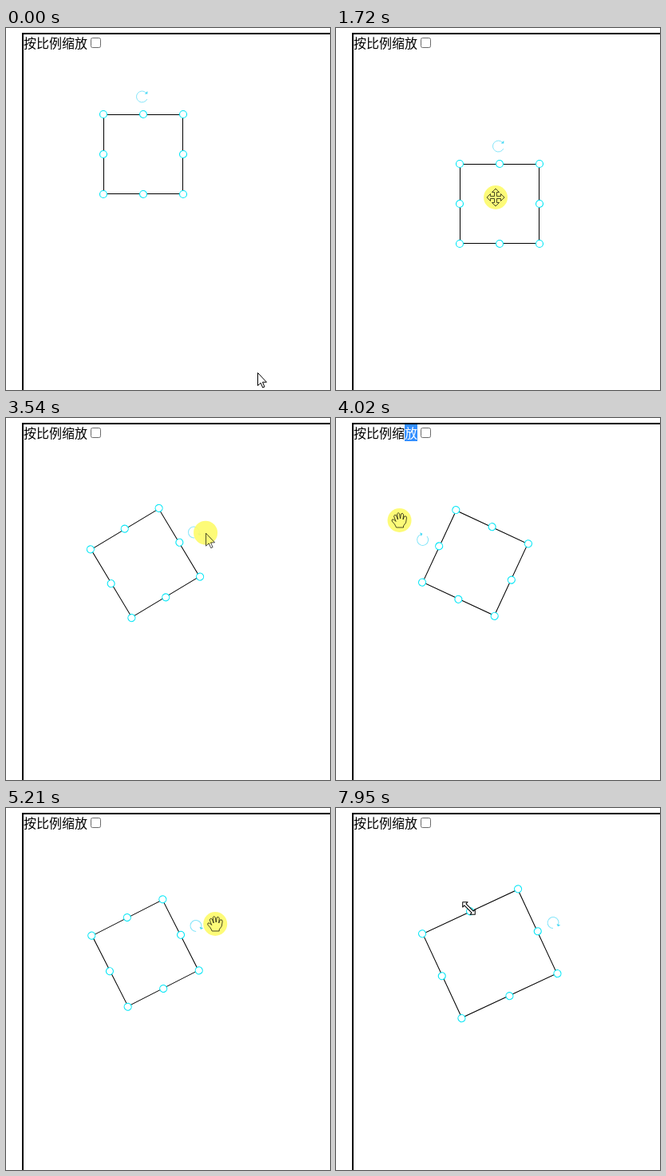
An HTML page that plays this animation: 406x453 px, repeating every 8 s.

```html
<!DOCTYPE html>
<html lang="zh-CN">
<head>
<meta charset="utf-8">
<title>缩放与旋转</title>
<style>
  html, body { margin: 0; width: 100%; height: 100%; overflow: hidden; background: #fff; }
  svg { display: block; width: 406px; height: 453px; }
  text { font: 16px "Noto Sans CJK SC", "Noto Sans CJK", sans-serif; }
  .handle { fill: #fff; stroke: #00e6f6; stroke-width: 1.1; }
  .arc { fill: none; stroke: #86e6fa; }
  .tip { fill: #45d9f5; }
</style>
</head>
<body>
<svg viewBox="0 0 406 453">
  <path d="M406 7H21V453" fill="none" stroke="#000" stroke-width="2"/>
  <text x="22" y="25">按比例缩放</text>
  <g id="selection">
    <rect x="86" y="8" width="16" height="21" fill="#338fff"/>
    <text x="86" y="25" fill="#fff">放</text>
  </g>
  <rect x="106.5" y="12.5" width="12" height="12" rx="2" fill="#fff" stroke="#6b6b6b"/>
  <g id="box">
    <rect id="outline" fill="none" stroke="#000"/>
    <g id="spin">
      <path class="arc" d="M6.3 3A7 7 0 1 1 5.2-4.7"/>
      <path class="tip" d="M6.8-7V-3.4H3.2Z"/>
    </g>
  </g>
  <circle id="halo" r="15" fill="#fdfb6c" fill-opacity=".92"/>
  <path id="cursor" stroke="#000" stroke-linejoin="round"/>
</svg>
<script>
const LOOP = 8000;
const $ = id => document.getElementById(id);

const RESIZE_SHAPE = 'M-11 0L-6.5-4.5V-1.5H6.5V-4.5L11 0 6.5 4.5V1.5H-6.5V4.5Z';
const SHAPES = {
  arrow: 'M.5.5V16.5L4.2 13.2 6.7 19 9 18 6.5 12.2H11.5Z',
  move: 'M0-11L4.5-6.5H1.5V-1.5H6.5V-4.5L11 0 6.5 4.5V1.5H1.5V6.5H4.5L0 11-4.5 6.5H-1.5V1.5H-6.5V4.5L-11 0-6.5-4.5V-1.5H-1.5V-6.5H-4.5Z',
  hand: 'M-4 9L-6 5-9.5 1Q-10-2-7-1L-4.5 1.5-7-5Q-6-8-4-6L-2-1-3-8Q-1-11 0-8L1-2 2-8Q4-10 5-7L4.5-1 6-5Q9-6 9-3L8 3 5 7V9Z',
  resize: RESIZE_SHAPE,
  diagonal: RESIZE_SHAPE
};

// Periods with the mouse button held down
const DRAG = [490, 2200], ROTATE = [2880, 5380], RESIZE = [6350, 7360];
const CIRCLING = [830, 1630];
const PIVOT = [174.5, 181.5];

// Glides: [from, to, x, y]; the pointer rests between them
const GLIDES = [
  [20, 480, 167, 150], [500, 800, 205, 217.4], [1650, 1720, 200, 212],
  [1820, 2150, 169.5, 173.5], [2250, 2800, 180.4, 105.5], [ROTATE[0], ROTATE[1], 262.5, 148.4],
  [5380, 5590, 249, 234], [5630, 6250, 241.5, 205.5], [6480, 6580, 282.5, 211.5],
  [6640, 6850, 297, 215], [6900, 7200, 278, 207], [7360, 7920, 166.5, 125.5]
];
// Swings about the pivot: [from, to, degrees, radius]
const SWINGS = [
  [3110, 3530, 63.4, 84.5], [3560, 3850, -60, 83], [3950, 4020, -60.6, 109],
  [4120, 4600, 55, 92], [4600, 4750, 36, 92], [4790, 5200, 67.4, 95], [5240, 5370, 69.4, 94]
];
const KINDS = [
  [0, 'arrow'], [350, 'move'], [2370, 'arrow'], [2700, 'hand'], [3150, 'arrow'],
  [3900, 'hand'], [5400, 'arrow'], [6200, 'resize'], [7420, 'move'], [7870, 'diagonal']
];

const clamp = (v, [lo, hi]) => Math.min(Math.max(v, lo), hi);
const within = (t, [from, to]) => t >= from && t < to;
const progress = (t, [from, to]) => clamp((t - from) / (to - from), [0, 1]);
const ease = k => k * k * (3 - 2 * k);
const radians = degrees => degrees * Math.PI / 180;

function follow(legs, start, t) {
  return legs.reduce((pos, [from, to, ...goal]) => {
    const k = ease(progress(t, [from, to]));
    return pos.map((v, i) => v + (goal[i] - v) * k);
  }, start);
}

const swingAt = t => follow(SWINGS, [4.4, 76], clamp(t, ROTATE));

function pointerAt(t) {
  if (within(t, CIRCLING)) {
    const a = radians(70 + 360 * progress(t, CIRCLING));
    return [186 + 56 * Math.cos(a), 184 + 35.5 * Math.sin(a)];
  }
  if (within(t, ROTATE)) {
    const [degrees, radius] = swingAt(t), a = radians(degrees);
    return [PIVOT[0] + radius * Math.sin(a), PIVOT[1] - radius * Math.cos(a)];
  }
  return follow(GLIDES, [315, 431], t);
}

function boxAt(t) {
  const grip = pointerAt(clamp(t, DRAG));
  const angle = swingAt(t)[0] - swingAt(0)[0];
  const c = Math.cos(radians(angle)), s = Math.sin(radians(angle));
  // The dragged corner moves while the opposite one stays fixed.
  const from = pointerAt(RESIZE[0]), to = pointerAt(clamp(t, RESIZE));
  const dx = to[0] - from[0], dy = to[1] - from[1];
  return {
    x: grip[0] + 5 + dx / 2,
    y: grip[1] + 8 + dy / 2,
    w: 100 + dx * c + dy * s,
    h: 100 + dx * s - dy * c,
    angle
  };
}

function set(node, attrs) {
  for (const name in attrs) node.setAttribute(name, attrs[name]);
}

const handles = [];
for (const u of [-.5, 0, .5]) {
  for (const v of [-.5, 0, .5]) {
    if (!u && !v) continue;
    const dot = document.createElementNS($('box').namespaceURI, 'circle');
    set(dot, { r: 4.5, class: 'handle' });
    handles.push({ dot: $('box').appendChild(dot), u, v });
  }
}

function draw(t) {
  const { x, y, w, h, angle } = boxAt(t);
  const at = `translate(${pointerAt(t)})`;
  const pressed = [DRAG, ROTATE, RESIZE].some(period => within(t, period));
  const kind = KINDS.filter(key => key[0] <= t).pop()[1];

  set($('box'), { transform: `translate(${x} ${y}) rotate(${angle})` });
  set($('outline'), { x: .5 - w / 2, y: .5 - h / 2, width: w - 1, height: h - 1 });
  set($('spin'), { transform: `translate(-1.5 ${-h / 2 - 22})` });
  for (const { dot, u, v } of handles) set(dot, { cx: u * w, cy: v * h });

  set($('halo'), { transform: at, visibility: pressed ? 'visible' : 'hidden' });
  set($('cursor'), {
    d: SHAPES[kind],
    transform: kind === 'diagonal' ? at + ' rotate(45)' : at,
    fill: pressed ? 'none' : '#fff',
    'stroke-opacity': pressed ? .7 : 1
  });
  set($('selection'), { visibility: within(t, [3960, 4700]) ? 'visible' : 'hidden' });
}

const start = performance.now();
function tick() {
  draw((performance.now() - start) % LOOP);
  requestAnimationFrame(tick);
}
tick();
</script>
</body>
</html>
```
